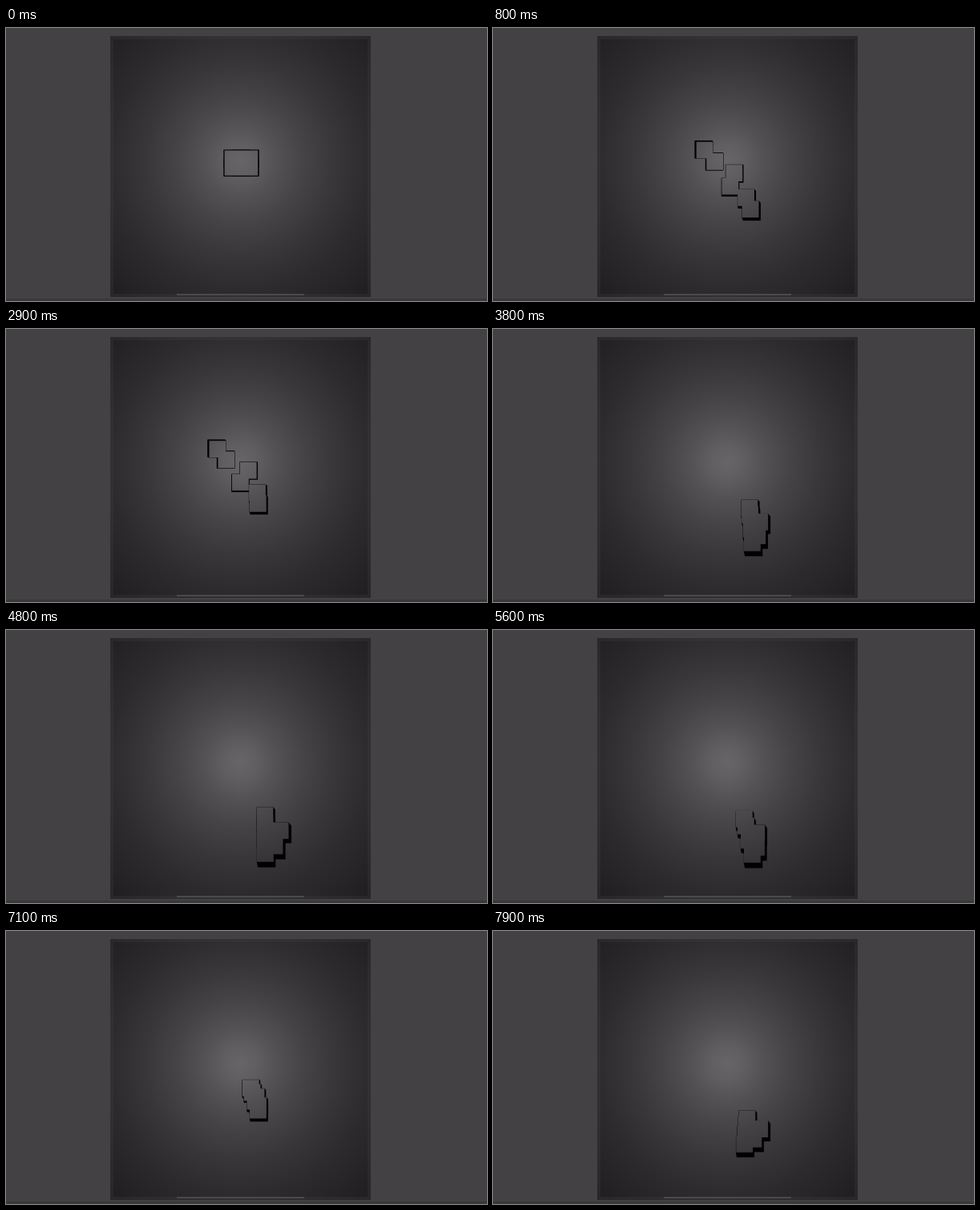
Recreate the animation shown at these times as an HTML page. Size 600x340 px, loop 8000 ms.

```html
<!DOCTYPE html>
<html lang="en">
<head>
<meta charset="utf-8">
<title>Moving blocks</title>
<style>
  html, body { margin: 0; width: 600px; height: 340px; overflow: hidden; background: #434143; }
  svg { display: block; }
</style>
</head>
<body>
<svg width="600" height="340" viewBox="0 0 600 340">
  <defs>
    <radialGradient id="glow" gradientUnits="userSpaceOnUse" cx="292" cy="165" r="230">
      <stop offset="0" stop-color="#676567"/>
      <stop offset=".09" stop-color="#605e60"/>
      <stop offset=".2" stop-color="#535153"/>
      <stop offset=".35" stop-color="#454346"/>
      <stop offset=".52" stop-color="#383639"/>
      <stop offset=".7" stop-color="#2d2b2e"/>
      <stop offset="1" stop-color="#201e21"/>
    </radialGradient>
  </defs>
  <rect width="600" height="340" fill="#434143"/>
  <rect y="337" width="600" height="3" fill="#3a383a"/>
  <rect x="130" y="10" width="325" height="325" fill="url(#glow)"/>
  <rect x="132" y="12" width="321" height="321" fill="none" stroke="#434143" stroke-opacity=".25" stroke-width="4"/>
  <rect x="213" y="331" width="159" height="2" fill="#4a494b"/>
  <path id="sides" stroke="#000" stroke-opacity=".4" stroke-width=".4"/>
  <path id="faces" fill="url(#glow)"/>
</svg>
<script>
const LOOP = 8000, STEP = 100, SIZE = 20.8, COUNT = 6;
const FIRST_REST = 40, BEAT = 1035;
const HUB = { x: 283, y: 152.5 };
const CENTER = { x: 291, y: 166 }, DEPTH = 0.055;

// Ends of the column that the blocks form on each beat, and its sideways bulge.
const bursts = [
  { from: [249, 139], to: [315, 228], bulge: 15 },
  { from: [212, 136], to: [337, 229], bulge: 0 },
  { from: [244, 134], to: [310, 226], bulge: 24 },
  { from: [309.5, 212.5], to: [313, 256], bulge: 12 },
  { from: [312.5, 220.5], to: [313, 268], bulge: 20 },
  { from: [303, 225], to: [313, 269], bulge: 12 },
  { from: [305, 213], to: [322, 264], bulge: 6 },
  { from: [306.5, 223.5], to: [303.3, 255], bulge: 18 }
];

const sides = document.getElementById("sides");
const faces = document.getElementById("faces");
const lerp = (a, b, u) => a + (b - a) * u;

// Resting blocks overlap by halves; the cluster tightens beat by beat.
function rest(i, beat) {
  const gap = SIZE / 2 * Math.max(0, 1 - beat / 4);
  return [HUB.x + (i % 3 - 1) * gap, HUB.y + Math.floor(i / 3) * gap];
}

// Every other block swings out of the straight column.
function spread(i, { from, to, bulge }) {
  const u = i / (COUNT - 1);
  const swing = i % 2 ? 0 : bulge * Math.sin(Math.PI * u);
  return [lerp(from[0], to[0], u) + swing, lerp(from[1], to[1], u)];
}

function blocksAt(t) {
  const beats = Math.max(0, t - FIRST_REST) / BEAT;
  const beat = Math.floor(beats);
  const reach = Math.min(1, 1.15 * Math.sin(Math.PI * (beats - beat)) ** 1.2);
  return Array.from({ length: COUNT }, (_, i) => {
    const a = rest(i, beat), b = spread(i, bursts[beat]);
    return [lerp(a[0], b[0], reach), lerp(a[1], b[1], reach)];
  });
}

// Square projected away from the center of the panel.
function square([x, y], scale = 1) {
  const px = lerp(CENTER.x, x, scale), py = lerp(CENTER.y, y, scale);
  const s = SIZE * scale;
  return `M${px.toFixed(2)} ${py.toFixed(2)}h${s}v${s}h${-s}z`;
}

function extrude(block) {
  let d = "";
  for (let i = 0; i <= 8; i++) d += square(block, 1 + DEPTH * i / 8);
  return d;
}

function render(time) {
  const blocks = blocksAt(Math.floor((time % LOOP) / STEP) * STEP);
  sides.setAttribute("d", blocks.map(extrude).join(""));
  faces.setAttribute("d", blocks.map(b => square(b)).join(""));
}

const start = performance.now();
function tick() {
  render(performance.now() - start);
  requestAnimationFrame(tick);
}
tick();
</script>
</body>
</html>
```
